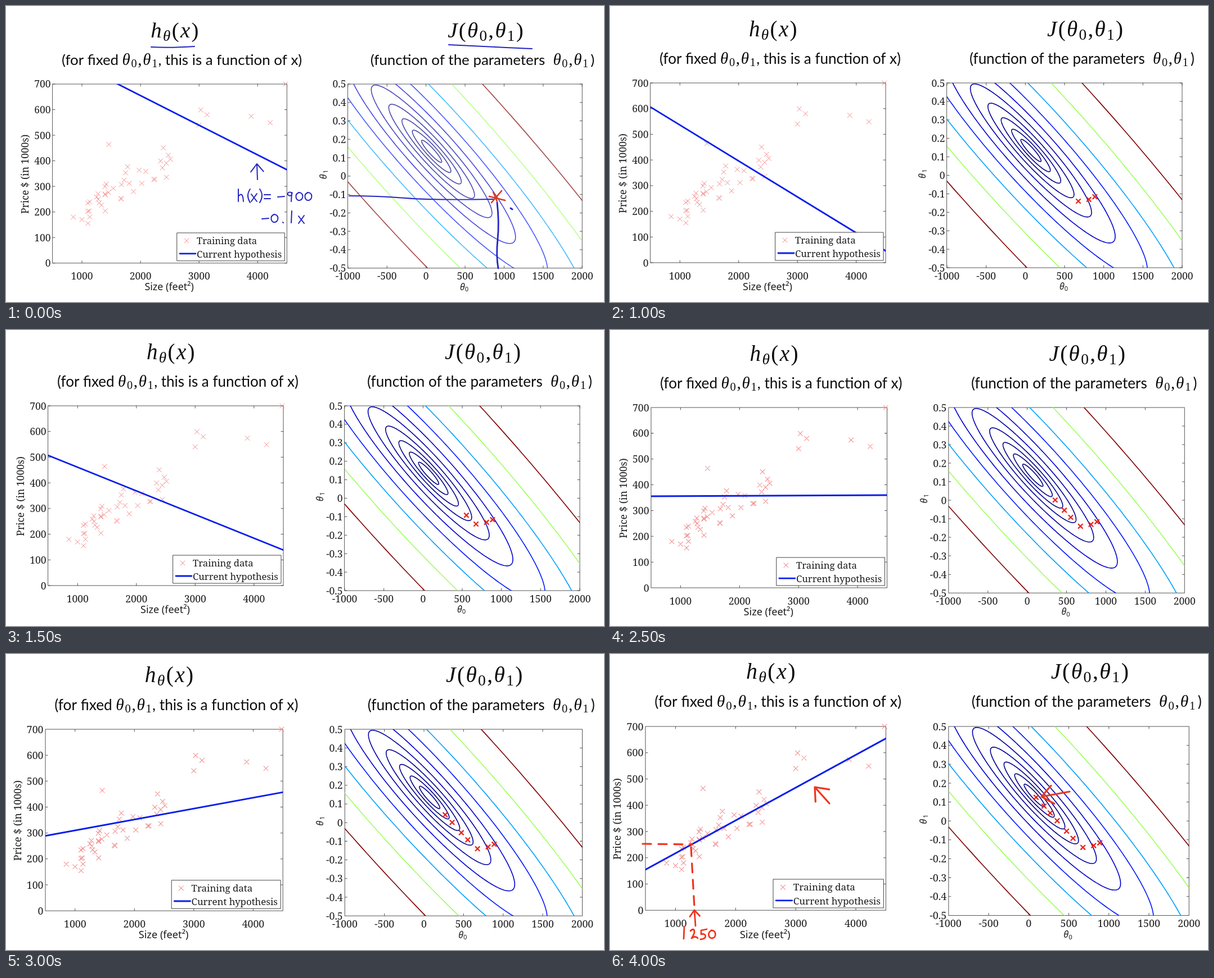
Write an HTML page with a canvas that moves like this. It is 1063 by 527 pixels and loops after 4.5 s.

```html
<!DOCTYPE html>
<html lang="en">
<head>
<meta charset="utf-8">
<title>Gradient descent</title>
<style>
  html, body { margin: 0; width: 100%; height: 100%; overflow: hidden; background: #fff; }
  canvas { display: block; }
</style>
</head>
<body>
<canvas id="stage" width="1063" height="527"></canvas>
<script>
const ctx = document.getElementById('stage').getContext('2d');
const STEP = 500;

// Each slide: top left of the left plot, zoom, theta0
const slides = [
  [83, 139, 0.996, 887], [62, 136, 1.02, 810], [72, 137, 1, 676],
  [75, 135, 1, 553], [82, 132, 1.004, 472], [73, 138, 1.0035, 355],
  [70, 134, 1.01, 268], [61, 131, 1.021, 191], [63, 129, 1.0225, 92]
];

// The descent curves down into a valley, then runs straight to the minimum
const theta1 = theta0 => Math.max(
  0.1683 - 0.000471 * theta0,
  0.024 * ((theta0 - 676) / 211) ** 2 - 0.14
);

// Outlying houses by size and price; the dense middle is random around a trend
const houses = [
  [852, 180], [1000, 170], [1458, 464], [3000, 540], [3031, 599],
  [3137, 580], [3890, 574], [4215, 549], [4478, 700]
];
let seed = 7;
const random = () => (seed = seed * 16807 % 2147483647) / 2147483647;
for (let i = 0; i < 38; i++) {
  const size = 1100 + 1550 * random() ** 1.5;
  houses.push([size, 75 + 0.128 * size + 90 * (random() + random() - 1)]);
}

const makePlot = (x, y, w, h, x0, x1, y0, y1) => ({
  x, y, w, h,
  px: v => x + (v - x0) / (x1 - x0) * w,
  py: v => y + h - (v - y0) / (y1 - y0) * h
});
const data = makePlot(75, 135, 418, 320, 500, 4500, 0, 700);
const cost = makePlot(602, 135, 418, 329, -1000, 2000, -0.5, 0.5);
const range = (start, step, count) =>
  Array.from({ length: count }, (_, i) => +(start + i * step).toFixed(1));

const SERIF = '"Noto Serif", serif';
const SANS = '"Noto Sans", sans-serif';
const LATO = '26px Lato, sans-serif';
const TICK = '17.5px ' + SERIF;
const BLUE = '#0a1eeb', PINK = '#f28c8c';
const BLUE_INK = '#2424c4', RED_INK = '#f0341c';

function text(str, x, y, font, align = 'left') {
  ctx.font = font;
  ctx.textAlign = align;
  ctx.fillText(str, x, y);
}

function rotated(x, y, draw) {
  ctx.save();
  ctx.translate(x, y);
  ctx.rotate(-Math.PI / 2);
  draw();
  ctx.restore();
}

// Letters are italic, "_" lowers the next character
function formula(str, x, y, size, family = '"Liberation Serif", serif', gap = 0.06) {
  for (const [token] of str.matchAll(/_?./g)) {
    const sub = token.length > 1, char = token.at(-1);
    const style = /[a-zθ]/i.test(char) ? 'italic ' : '';
    text(char, x, y + (sub ? size * 0.15 : 0), `${style}${sub ? size * 0.7 : size}px ${family}`);
    x += ctx.measureText(char).width + size * gap;
  }
}

function stroke(path, color, width, dash = []) {
  ctx.strokeStyle = color;
  ctx.lineWidth = width;
  ctx.setLineDash(dash);
  ctx.stroke(typeof path === 'string' ? new Path2D(path) : path);
}

const cross = (x, y, r, color, width) =>
  stroke(`M${x - r} ${y - r}l${2 * r} ${2 * r}M${x - r} ${y + r}l${2 * r} ${-2 * r}`, color, width);

function arrow(x0, y0, x, y, head, color, width) {
  const angle = Math.atan2(y0 - y, x0 - x);
  const barb = a => `${x + head * Math.cos(a)} ${y + head * Math.sin(a)}`;
  stroke(`M${x0} ${y0}L${x} ${y}M${barb(angle - 0.68)}L${x} ${y}L${barb(angle + 0.68)}`, color, width);
}

function clipped(plot, draw) {
  ctx.save();
  ctx.beginPath();
  ctx.rect(plot.x, plot.y, plot.w, plot.h);
  ctx.clip();
  draw();
  ctx.restore();
}

function axes(plot, xTicks, yTicks) {
  const { x, y, w, h } = plot;
  let path = `M${x} ${y}h${w}v${h}h${-w}z`;
  ctx.fillStyle = '#1c1c1c';
  for (const v of xTicks) {
    const px = plot.px(v);
    path += `M${px} ${y}v4M${px} ${y + h}v-4`;
    text(v, px, 484.5, TICK, 'center');
  }
  for (const v of yTicks) {
    const py = plot.py(v);
    path += `M${x} ${py}h4M${x + w} ${py}h-4`;
    text(v, x - 3.5, py + 6.5, TICK, 'right');
  }
  stroke(path, '#555', 1);
}

function headings() {
  ctx.fillStyle = '#0c0c0c';
  formula('h_θ(x)', 250, 52, 39);
  formula('J(θ_0,θ_1)', 780, 52, 39);
  text('(for fixed', 91, 101, LATO);
  formula('θ_0,θ_1', 199, 101, 29);
  text(', this is a function of x)', 520, 101, LATO, 'right');
  text('(function of the parameters', 642, 101, LATO);
  formula('θ_0,θ_1', 968, 101, 29);
  text(')', 1042, 101, LATO, 'right');
}

function hypothesisPlot(theta0) {
  const lineY = size => data.py(theta0 + theta1(theta0) * size);
  axes(data, range(1000, 1000, 4), range(0, 100, 8));
  text('Size (feet²)', 283, 503.5, '18px ' + SANS, 'center');
  rotated(32, 296, () => text('Price $ (in 1000s)', 0, 0, TICK, 'center'));
  for (const [size, price] of houses) cross(data.px(size), data.py(price), 4, PINK, 1);
  clipped(data, () => stroke(`M75 ${lineY(500)}L493 ${lineY(4500)}`, BLUE, 2.8));

  ctx.fillStyle = '#fff';
  ctx.fillRect(297, 401, 192, 50);
  stroke('M297 401h192v50h-192z', '#444', 1);
  cross(314, 415, 4, PINK, 1);
  stroke('M302 438h28', BLUE, 2.8);
  ctx.fillStyle = '#1c1c1c';
  text('Training data', 332, 421, '16.7px ' + SERIF);
  text('Current hypothesis', 332, 445, '16.7px ' + SERIF);
}

// Rainbow scale from dark blue (0) to dark red (1)
function jet(level) {
  const channel = peak => 255 * Math.min(1, Math.max(0, 1.5 - Math.abs(4 * level - peak)));
  return `rgb(${channel(3)}, ${channel(2)}, ${channel(1)})`;
}

// Level sets of a quadratic bowl, spaced geometrically
function contours() {
  const RATIO = 1.8831, COUNT = 10;
  for (let i = 0; i < COUNT; i++) {
    const r = Math.sqrt(974 * RATIO ** i - 650);
    const path = new Path2D();
    for (let t = 0; t < 6.3; t += 0.02)
      path.lineTo(751.3 + r * Math.cos(t), 255.2 + 1.1 * r * Math.cos(t - 0.374));
    stroke(path, jet(RATIO ** (i + 1 - COUNT)), 1.6);
  }
}

function costPlot(visited) {
  axes(cost, range(-1000, 500, 7), range(-0.5, 0.1, 11));
  formula('θ_0', 802, 503, 16, SANS, 0);
  rotated(564, 305, () => formula('θ_1', 0, 0, 16, SANS, 0.1));
  ctx.globalAlpha = visited.length ? 1 : 0.72;
  clipped(cost, contours);
  ctx.globalAlpha = 1;
  for (const [, , , theta0] of visited)
    cross(cost.px(theta0), cost.py(theta1(theta0)), 3.5, '#e8261c', 2.3);
}

// Pen strokes of each handwritten character
const glyphs = {
  'h': 'M2 0v22M2 13q8-10 9 9', 'x': 'M1 9l10 13M11 8L1 22',
  '(': 'M7 0q-8 11 0 24', ')': 'M0 0q8 11 0 24',
  '=': 'M0 10h11M0 17h11', '-': 'M0 14l12-1', '.': 'M5 20l1 1',
  '0': 'M6 6c-9 3-6 15 1 14s8-14-2-14', '1': 'M5 0l-1 21',
  '2': 'M0 7c6-7 11 0 2 13q7-5 11 0', '5': 'M13 4L3 6V13c10-3 11 9-1 9',
  '9': 'M10 7C0 1-2 15 9 11V6L8 22'
};

function handwrite(str, x, y, color, width) {
  for (const char of str) {
    ctx.save();
    ctx.translate(x, y);
    stroke(glyphs[char] || '', color, width);
    ctx.restore();
    x += '() '.includes(char) ? 8 : 16;
  }
}

function firstNotes() {
  stroke('M258 73Q290 75 335 72M787 69Q830 71 870 73T935 76', BLUE_INK, 2);
  stroke('M610 338Q660 338 710 342T866 344', BLUE_INK, 1.8);
  stroke('M873 350Q877 385 874 415T875 467', BLUE_INK, 2.8);
  arrow(447, 309, 446, 281, 18, BLUE_INK, 2);
  handwrite('h(x)= -900', 411, 326, BLUE_INK, 2);
  handwrite('-0.1x', 455, 365, BLUE_INK, 2);
  stroke('M897 360l3 2', BLUE_INK, 3);
  stroke('M859 339L887 346M863 350L881 329M866 331L873 348', '#d63a24', 2.6);
}

function lastNotes() {
  stroke('M58 338L146 339', RED_INK, 3.2, [15, 13]);
  stroke('M144 344L150 451', RED_INK, 3.2, [16, 13]);
  arrow(152, 484, 150, 456, 14, RED_INK, 2.8);
  handwrite('1250', 127, 486, RED_INK, 2.8);
  arrow(390, 266, 364, 237, 26, RED_INK, 3.2);
  arrow(817, 245, 767, 254, 26, RED_INK, 3.2);
}

function draw(index) {
  const [x, y, zoom, theta0] = slides[index];
  ctx.setTransform(1, 0, 0, 1, 0, 0);
  ctx.fillStyle = '#fff';
  ctx.fillRect(0, 0, 1063, 527);
  ctx.lineCap = ctx.lineJoin = 'round';
  ctx.setTransform(zoom, 0, 0, zoom, x - data.x * zoom, y - data.y * zoom);
  headings();
  hypothesisPlot(theta0);
  costPlot(index ? slides.slice(0, index + 1) : []);
  ctx.setTransform(1, 0, 0, 1, 0, 0);
  if (index === 0) firstNotes();
  if (index === slides.length - 1) lastNotes();
}

function tick() {
  draw(Math.floor(performance.now() / STEP) % slides.length);
  requestAnimationFrame(tick);
}
tick();
</script>
</body>
</html>
```
